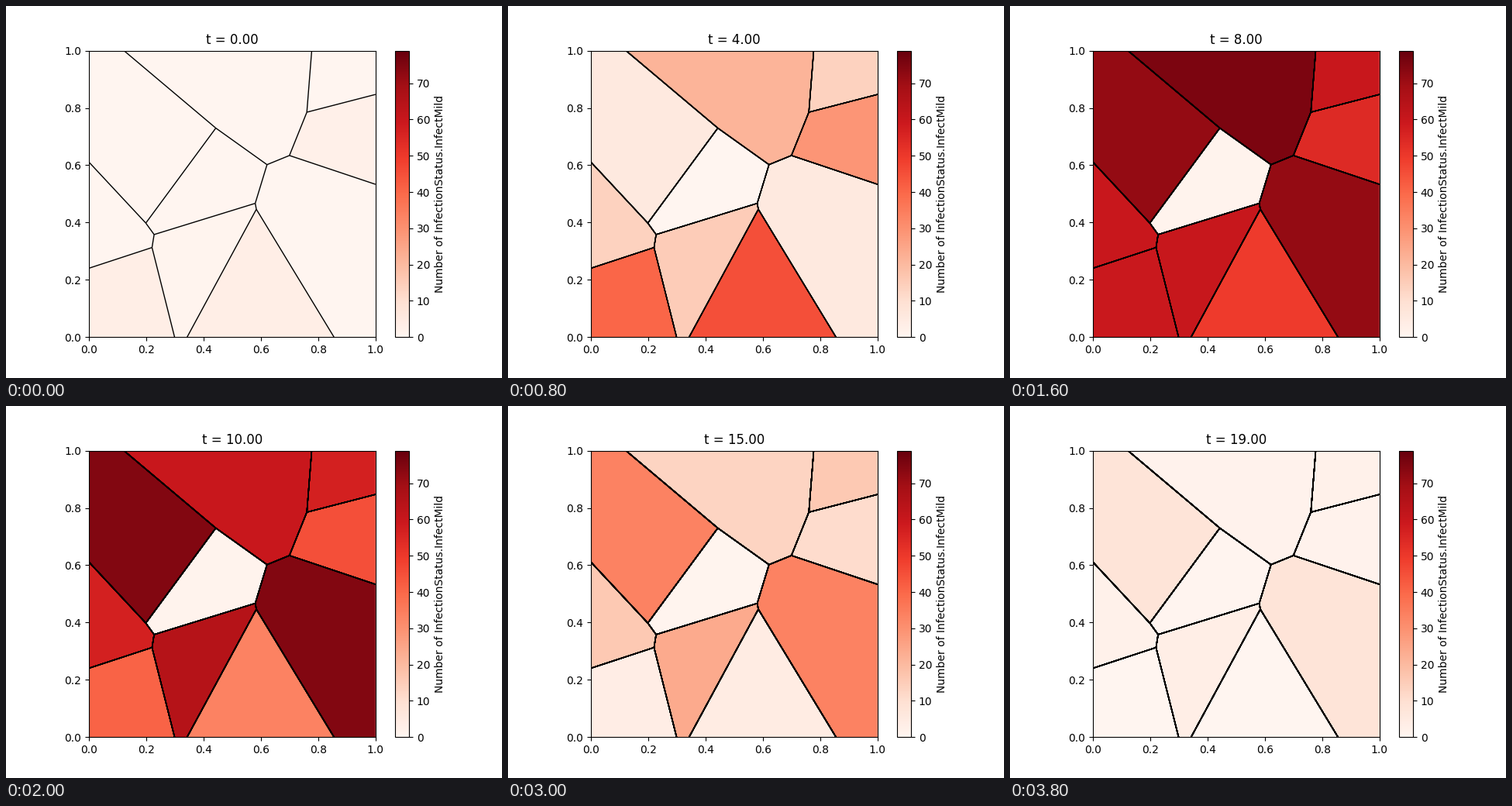
A matplotlib script for the animation above (4000 ms loop, 640 by 480 pixels).

```python
import matplotlib.pyplot as plt
import numpy as np
from matplotlib.animation import FuncAnimation
from matplotlib.cm import ScalarMappable
from matplotlib.collections import LineCollection, PolyCollection
from matplotlib.colors import Normalize

FRAMES, INTERVAL = 20, 200

# Each town: site (x, y), then its outbreak: peak count, peak time, rise, fall
TOWNS = np.array([
    (.2783, .5407, 77, 8.8, 2.1, 4.8),
    (.6009, .9234, 78, 6.9, 1.8, 4.3),
    (.9394, .8966, 61, 8.5, 2.6, 4.0),
    (.9710, .7744, 55, 7.3, 2.9, 4.3),
    (.8316, .3582, 77, 8.8, 2.1, 4.8),
    (.5479, .1859, 58, 5.7, 2.4, 4.1),
    (.3856, .2738, 66, 9.3, 3.1, 4.0),
    (.0921, .1999, 64, 6.7, 2.8, 3.5),
    (.0501, .3279, 61, 8.5, 2.6, 4.0),
    (.3106, .5169, 1, 9.0, 3.0, 9.0),
])
SITES = TOWNS[:, :2]
PEAK, PEAK_TIME, RISE, FALL = TOWNS[:, 2:].T


def clip(poly, site, other):
    """Keep the part of poly that is nearer to site than to other."""
    normal = other - site
    depth = (poly - (site + other) / 2) @ normal
    kept = []
    for k in range(len(poly)):
        p, q, dp, dq = poly[k - 1], poly[k], depth[k - 1], depth[k]
        if dp * dq < 0:
            kept.append(p + (q - p) * dp / (dp - dq))
        if dq <= 0:
            kept.append(q)
    return np.array(kept)


def voronoi_cell(site):
    poly = np.array([(0, 0), (1, 0), (1, 1), (0, 1)], float)
    for other in SITES:
        if not np.array_equal(other, site):
            poly = clip(poly, site, other)
    return poly.round(6)


def inner_edges(polys):
    """Edges between two cells, each listed once."""
    edges = set()
    for poly in polys:
        for p, q in zip(poly, np.roll(poly, -1, axis=0)):
            on_border = (p == q) & ((p == 0) | (p == 1))
            if not on_border.any():
                edges.add(tuple(sorted((tuple(p), tuple(q)))))
    return sorted(edges)


def infected(t):
    """Bell curves with a steep rise and a slower fall."""
    width = np.where(t < PEAK_TIME, RISE, FALL)
    return PEAK * np.exp(-((t - PEAK_TIME) / width) ** 2 / 2)


polys = [voronoi_cell(site) for site in SITES]
edges = inner_edges(polys)

fig, ax = plt.subplots(figsize=(6.4, 4.8), dpi=100)
scale = ScalarMappable(Normalize(0, 79), "Reds")
fig.colorbar(scale, ax=ax, label="Number of InfectionStatus.InfectMild")
ax.set(xlim=(0, 1), ylim=(0, 1), aspect="equal")
title = ax.set_title("")

cells = ax.add_collection(PolyCollection(polys, edgecolors="none", zorder=1))
lines = ax.add_collection(LineCollection(edges, colors="k", linewidths=1, zorder=2))


def update(t):
    cells.set_facecolor(scale.to_rgba(infected(t)))
    # outlines are overdrawn once per step, so their soft edges darken
    lines.set_segments(edges * (t + 1))
    title.set_text(f"t = {t:.2f}")
    return cells, lines, title


anim = FuncAnimation(fig, update, frames=FRAMES, interval=INTERVAL,
                     repeat=True, repeat_delay=0, blit=False)
plt.show()
```
